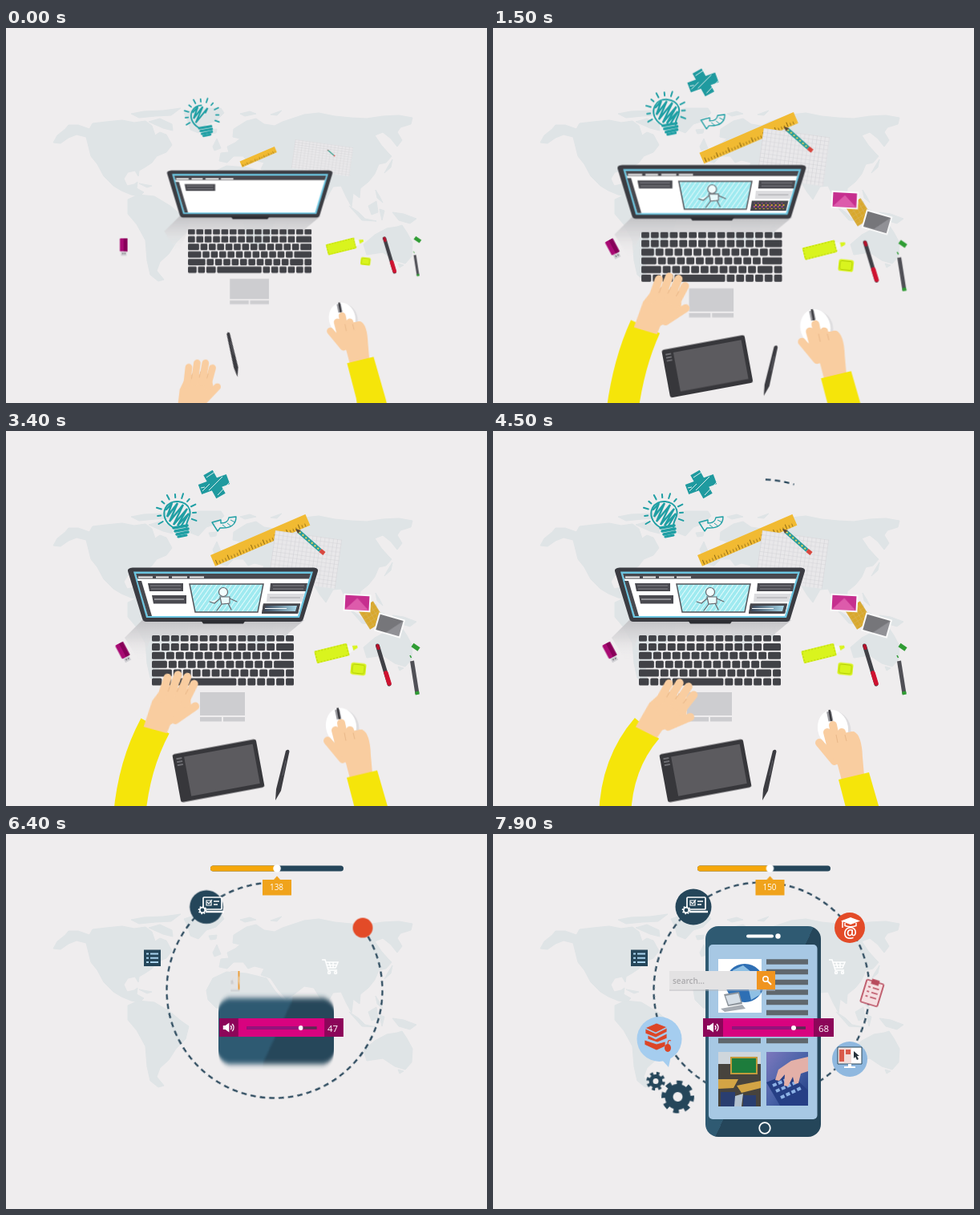
These frames come from a looping animation (600x468 px, 8 s). An HTML page:

```html
<!DOCTYPE html>
<html lang="en">
<head>
<meta charset="utf-8">
<title>Desk to mobile</title>
<style>
@property --n { syntax: "<integer>"; inherits: false; initial-value: 0; }
html, body { margin: 0; width: 100%; height: 100%; overflow: hidden; background: #efedee; }
#stage { position: relative; width: 600px; height: 468px; overflow: hidden; }
svg { position: absolute; inset: 0; }
svg, .num { font-family: "Open Sans", "Noto Sans", sans-serif; }
#stage * { animation-duration: 8s; animation-iteration-count: infinite; animation-fill-mode: both; animation-timing-function: linear; }

/* desk */
#desk { animation-name: fade; }
#camera { animation-name: camera; transform-origin: 529px 226px; }
@keyframes fade { 0%, 61.25% { opacity: 1 } 68.75%, 100% { opacity: 0 } }
@keyframes camera {
  0% { transform: scale(.87); animation-timing-function: cubic-bezier(.12,.5,.35,1) }
  30%, 100% { transform: none }
}
/* settles from a starting pose given by --from */
.settle { animation-name: settle; transform-box: fill-box; transform-origin: center; }
@keyframes settle {
  0% { transform: var(--from); animation-timing-function: ease-out }
  13%, 100% { transform: none }
}
.corner { transform-origin: 0 50%; }
.pop, .wide, .show { animation-delay: var(--d) !important; transform-box: fill-box; transform-origin: center; }
.pop { animation-name: pop; }
.wide { animation-name: wide; }
.show { animation-name: show; }
@keyframes pop { 0% { transform: scale(0); animation-timing-function: ease-out } 4%, 64% { transform: none } 64.01%, 100% { transform: scale(0) } }
@keyframes wide { 0% { transform: scaleX(0); animation-timing-function: ease-out } 5%, 64% { transform: none } 64.01%, 100% { transform: scaleX(0) } }
@keyframes show { 0% { opacity: 0 } 2.5%, 64% { opacity: 1 } 64.01%, 100% { opacity: 0 } }
.sketch { animation-name: sketch; stroke-dasharray: 1 1; }
@keyframes sketch { 0% { stroke-dashoffset: .5 } 8%, 100% { stroke-dashoffset: 0 } }

#right { animation-name: right; }
@keyframes right {
  0% { transform: translate(-9px,17px) }
  18.75% { transform: translate(-11px,9px) }
  28.75% { transform: none }
  56.25% { transform: translate(12px,5px) }
  66.25%, 100% { transform: translate(12px,11px) }
}
#left { animation-name: left; transform-origin: 180px 366px; }
@keyframes left {
  0% { transform: translate(0,150px); animation-timing-function: ease-out }
  13% { transform: translate(10px,10px) rotate(14deg) }
  18.75% { transform: translate(7px,9px) rotate(13deg) }
  28.75% { transform: none; animation-timing-function: ease-in-out }
  56.25% { transform: translate(12px,6px) rotate(23deg); animation-timing-function: ease-in-out }
  66.25%, 100% { transform: translate(-8px,13px) rotate(8deg) }
}
#sleeve { animation-name: sleeve; }
@keyframes sleeve {
  0% { d: path("M157 640 Q165 570 180 516"); animation-timing-function: ease-out }
  13% { d: path("M160 480 Q168 415 190 375") }
  18.75% { d: path("M158 480 Q166 420 187 374") }
  28.75% { d: path("M156 480 Q165 420 180 365"); animation-timing-function: ease-in-out }
  56.25% { d: path("M152 480 Q154 415 192 371"); animation-timing-function: ease-in-out }
  66.25%, 100% { d: path("M152 480 Q154 420 171 378") }
}

/* ring */
#spin { animation-name: spin; transform-origin: 335px 195px; }
#sweep { animation-name: sweep; stroke-dasharray: 360 360; }
@keyframes spin { 0%, 55% { transform: rotate(-91deg) } 80% { transform: rotate(-30deg) } 100% { transform: rotate(18deg) } }
@keyframes sweep { 0%, 55% { stroke-dashoffset: 360 } 66.25% { stroke-dashoffset: 222 } 80% { stroke-dashoffset: 67 } 85%, 100% { stroke-dashoffset: 0 } }
#ring { animation-name: ring; }
@keyframes ring { 0%, 55% { opacity: 0 } 55.01%, 100% { opacity: 1 } }

/* mobile */
#media, #numbers { animation-name: media; }
@keyframes media { 0%, 68.75% { visibility: hidden } 68.76%, 100% { visibility: visible } }
#body { animation-name: grow, blur; }
@keyframes grow {
  0%, 77% { y: 246px; height: 0 }
  80% { y: 205px; height: 82px }
  84%, 100% { y: 115px; height: 263px }
}
@keyframes blur { 0%, 83.5% { filter: url(#soft) } 83.51%, 100% { filter: none } }
#fill { animation-name: fill; }
@keyframes fill { 0%, 71.25% { width: 3px; animation-timing-function: ease-out } 80% { width: 83px } 98.75%, 100% { width: 90.5px } }
.thumb { animation-name: thumb; }
@keyframes thumb { 0%, 71.25% { transform: none; animation-timing-function: ease-out } 80% { transform: translateX(83px) } 98.75%, 100% { transform: translateX(90.5px) } }
#bar { animation-name: bar; transform-origin: 343px 242px; }
@keyframes bar { 0%, 76.25% { transform: scaleX(0) } 80% { transform: scaleX(.95) } 83%, 100% { transform: none } }
#knob { animation-name: knob; }
@keyframes knob { 0%, 76% { transform: translateX(-20px) } 80% { transform: translateX(-6px) } 98.75%, 100% { transform: none } }
#cart { animation-name: cart; }
@keyframes cart {
  0%, 77.5% { transform: translateX(-32px); opacity: 0 }
  80% { transform: translateX(-25px); opacity: 1; animation-timing-function: ease-out }
  87%, 100% { transform: none; opacity: 1 }
}
#screenIcon { animation-name: slide; }
@keyframes slide { 0%, 78% { transform: translateX(10px) } 80% { transform: translateX(4px) } 83%, 100% { transform: none } }
.gear { animation-name: turn; transform-box: fill-box; transform-origin: center; }
.back { animation-direction: reverse; }
@keyframes turn { to { transform: rotate(360deg) } }

.num { position: absolute; width: 36px; text-align: center; color: #fff; counter-reset: n var(--n); }
.num::after { content: counter(n); }
#value { left: 236.5px; top: 58.5px; font: 10px/15px "Open Sans", "Noto Sans", sans-serif; animation-name: thumb, value; }
@keyframes value { 0%, 71.25% { --n: 0; animation-timing-function: ease-out } 80% { --n: 138 } 98.75%, 100% { --n: 150 } }
#volume { left: 394.5px; top: 234px; font: 11.5px/17px "Open Sans", "Noto Sans", sans-serif; animation-name: loud, level; }
@keyframes loud { 0%, 78% { opacity: 0; transform: translateX(-8px) } 80% { opacity: 1; transform: translateX(-5px) } 83%, 100% { opacity: 1; transform: none } }
@keyframes level { 0%, 76% { --n: 20 } 80% { --n: 47 } 98.75%, 100% { --n: 68 } }
</style>
</head>
<body>
<div id="stage">
<svg width="600" height="468" viewBox="0 0 600 468" fill="none">
<defs>
  <linearGradient id="shade" x1="0" y1="237" x2="0" y2="285" gradientUnits="userSpaceOnUse">
    <stop stop-color="#c3c3c6"/><stop offset=".45" stop-color="#d9d8da" stop-opacity=".8"/><stop offset="1" stop-color="#efedee" stop-opacity="0"/>
  </linearGradient>
  <linearGradient id="case" x1="260" y1="209" x2="418" y2="283" gradientUnits="userSpaceOnUse">
    <stop offset=".5" stop-color="#2f5a72"/><stop offset=".5" stop-color="#25465a"/>
  </linearGradient>
  <linearGradient id="sky" x2="1"><stop stop-color="#39465a"/><stop offset="1" stop-color="#a8d9ea"/></linearGradient>
  <linearGradient id="desk2" x2="1" y2="1"><stop stop-color="#7d78bd"/><stop offset=".5" stop-color="#4a63a8"/><stop offset="1" stop-color="#1e3a80"/></linearGradient>
  <filter id="soft" x="-10%" y="-20%" width="120%" height="140%"><feGaussianBlur stdDeviation="0 3"/></filter>
  <pattern id="grid" width="5.2" height="5.2" patternUnits="userSpaceOnUse"><path d="M0 0H5.2M0 0V5.2" stroke="#cfcfd3"/></pattern>
  <pattern id="hatch" width="5" height="5" patternUnits="userSpaceOnUse" patternTransform="rotate(35)"><path d="M0 0V5" stroke="#e4fbfc" stroke-width="2"/></pattern>
  <pattern id="dots" width="5" height="5" patternUnits="userSpaceOnUse"><path d="M0 0h2v2h-2z" fill="#e8a13a"/><path d="M3 2h2v2h-2z" fill="#b04a9a"/></pattern>
  <mask id="trim" maskUnits="userSpaceOnUse" x="180" y="40" width="310" height="310"><circle id="sweep" cx="335" cy="195" r="134.5" pathLength="360" stroke="#fff" stroke-width="8"/></mask>
</defs>

<g id="map" fill="#dfe4e6" stroke="#dfe4e6" stroke-linejoin="round">
  <path d="M59 143 64 134 74 126 78 121 90 121 104 126 108 119 125 117 145 115 160 118 174 116 182 122 186 134 192 130 200 133 207 146 200 155 188 160 182 168 173 174 166 178 165 185 161 178 152 180 147 188 151 197 160 195 164 192 163 200 172 205 167 210 156 208 144 203 134 197 122 185 114 170 106 160 103 148 100 136 88 133 78 137 68 144Z"/>
  <path d="M222 106 240 100 268 100 272 106 262 116 250 120 240 131 230 127 227 116ZM156 107 172 104 196 103 218 100 206 109 186 110 166 112ZM178 117 192 113 207 120 208 128 196 125ZM166 194 182 197 176 199ZM253 127 263 126 262 131 255 132ZM258 148 263 138 268 150 260 153Z"/>
  <path d="M152 214 165 208 185 210 205 222 218 233 228 240 224 256 212 268 203 282 192 292 188 303 197 314 190 316 180 308 176 290 174 265 163 245 152 232Z"/>
  <path d="M266 166 268 156 278 155 276 148 286 143 292 138 283 136 284 126 300 116 312 113 322 120 335 122 345 117 360 112 372 108 390 106 410 110 430 112 450 113 470 110 490 109 507 112 505 120 492 124 488 130 494 140 488 148 480 138 470 130 460 134 468 146 476 155 481 160 474 168 465 170 460 182 452 192 442 200 441 212 433 206 431 223 424 210 418 197 408 198 399 214 392 205 384 192 372 190 362 198 350 206 340 195 330 180 318 176 322 168 310 165 302 168 296 160 284 160 276 168Z"/>
  <path d="M250 195 258 180 275 172 300 174 325 180 335 195 348 210 358 210 345 228 333 245 330 262 320 272 308 275 300 262 297 245 292 230 280 218 262 217 252 207ZM346 250 352 243 351 258 346 260Z"/>
  <path d="M446 270 460 258 475 250 488 248 494 246 500 255 507 268 506 285 498 294 485 290 470 280 450 283ZM428 222 440 230 448 238 462 241 444 240ZM452 222 462 216 464 230 456 233ZM466 226 472 228 469 240ZM482 230 496 232 512 238 504 244 490 240ZM461 202 466 210 470 218 463 212ZM482 164 480 174 472 181 477 172ZM489 294 496 296 491 299Z"/>
  <path d="M292 107 304 104 312 107 298 110ZM330 108 344 103 338 109Z"/>
</g>

<g id="desk"><g id="camera">
  <g class="settle" style="--from:translate(-11px,-11px)" stroke="#1f9fa4" stroke-width="2" stroke-linecap="round">
    <path class="sketch" pathLength="1" d="M208 120C198 114 195 104 199 96C205 84 225 86 229 98C232 107 224 112 225 120"/>
    <path class="sketch" pathLength="1" stroke-width="2.4" d="M200 98 207 90 201 107 214 90 204 113 221 92 209 117 226 97 214 118 228 103 219 118"/>
    <path d="M209 121 226 118M211 125 227 122M213 129 227 126" stroke-width="3.5"/>
    <path d="M215 132 225 130" stroke-width="3"/>
    <g id="rays"></g>
  </g>
  <g class="pop" style="--d:.45s">
    <path d="M242 73 277 60M252 52 268 81" stroke="#1f9a9f" stroke-width="13"/>
    <path d="M245 75 254 66M250 58 262 50M253 74 270 57M264 80 280 63M248 70 243 71" stroke="#dfeeee"/>
  </g>
  <g class="pop" style="--d:.75s" stroke="#1f9fa4" stroke-width="1.4" stroke-linejoin="round">
    <path d="M287 107Q287 122 267 121L264 125 257 114 268 111 268 115Q277 115 278 108Z"/>
    <path d="M270 117 275 121M276 115 281 119M280 111 286 114" stroke-width="1"/>
  </g>

  <g transform="translate(255 155) rotate(-23.3)"><g class="settle corner" style="--from:scale(.42,.6)">
    <path d="M0 0H129V15H0Z" fill="#f1ba32"/>
    <path d="M3 12.5H127" stroke="#8d6a14" stroke-width="4" stroke-dasharray=".8 3.2"/>
    <path d="M3 11H127" stroke="#8d6a14" stroke-width="6" stroke-dasharray="1 15"/>
  </g></g>
  <g transform="translate(336 124) rotate(8)"><g class="settle corner" style="--from:translateY(-8px) scaleY(.68)">
    <path d="M0 0H84V62H0Z" fill="#e9e8ea"/><path d="M0 0H84V62H0Z" fill="url(#grid)"/>
  </g></g>
  <g class="settle" style="--from:translate(8px,8px) scale(.3)">
    <path d="M366 126 392 149" stroke="#2a9c9a" stroke-width="5"/>
    <path d="M366 126 392 149" stroke="#f0d45a" stroke-width="2" stroke-dasharray="2 3"/>
    <path d="M392 149 397 153" stroke="#d8473f" stroke-width="5"/>
    <path d="M361 122 368 124 364 128Z" fill="#5b4a35"/>
  </g>

  <g id="laptop">
    <path d="M170 236 148 258 168 290 182 256H348L372 236Z" fill="url(#shade)"/>
    <path d="M158 170.500H384Q390 171 389 175L371 234Q370 238 366 238H175Q171 238 170 234L152 175Q151 171 158 170.500Z" fill="#3b3c42"/>
    <path d="M243 236H299L296 240.500H246Z" fill="#2d2e33"/>
    <path d="M159 175.500H383L366 233H175Z" fill="#6cc5e0"/>
    <path d="M162 178H380L364 231H177Z" fill="#fff"/>
    <path d="M162 178H380L378 184.500H164ZM164 187H169L182 231H177Z" fill="#48484e"/>
    <path d="M165 182.500H183M187 182.500H203M207 182.500H226M229 182.500H247" stroke="#f2f2f2" stroke-width="2"/>
    <path d="M177 190H221V200H179Z" fill="#4a4a50"/><path d="M180 193H218M181 197H218" stroke="#85858b"/>
    <g class="show" style="--d:2.9s"><path d="M182 205H225V215.500H184Z" fill="#4a4a50"/><path d="M185 210H222" stroke="#a6a6ab" stroke-width="1.500"/></g>
    <g class="show" style="--d:.4s"><path d="M330 190H376L374 200H329Z" fill="#4a4a50"/><path d="M333 193H372M333 197H371" stroke="#85858b"/></g>
    <g class="show" style="--d:.7s"><path d="M326 203H372L369 213H325Z" fill="#dcdcdf"/><path d="M329 208H367" stroke="#a4a4a8"/></g>
    <g class="show" style="--d:1s"><path d="M321 215.500H367L364 228H319Z" fill="#46464c"/><path d="M324 218H363L361 226H322Z" fill="url(#dots)"/></g>
    <g class="show" style="--d:1.800s"><path d="M321 215.500H367L364 228H319Z" fill="#46464c"/><path d="M324 218H363L361 225H322Z" fill="url(#sky)"/><path d="M323 221.500H350" stroke="#fff"/></g>
    <g class="pop" style="--d:.8s">
      <path d="M229 191H321L314 226H236Z" fill="#9feaf0"/>
      <path d="M229 191H321L314 226H236Z" fill="url(#hatch)" stroke="#55555b" stroke-width="1.500"/>
    </g>
    <g class="show" style="--d:1.050s" stroke="#68686e" stroke-width="1.200" stroke-linecap="round">
      <circle cx="271" cy="201" r="5.500" fill="#f2fdfd"/>
      <path d="M267 207H279V215L269 216ZM267 209 260 215 254 213M279 209 288 213M269 216 263 224M277 215 281 223" fill="#e9fbfc"/>
    </g>
    <g id="keys" fill="#414247"></g>
    <path d="M242 326H298V355H242ZM242 357H269V362.500H242ZM271 357H298V362.500H271Z" fill="#cdcdd0"/>
  </g>

  <g class="settle" style="--from:translate(-57px,4px) rotate(28deg)"><g transform="translate(146 275) rotate(-28)">
    <rect x="-5.500" y="-11" width="11" height="19" rx="1.500" fill="#a80a73"/><path d="M0-11H5.500V8H0Z" fill="#870059"/>
    <path d="M-4 8H4V14H-4Z" fill="#d0d0d4"/><path d="M-2 10h1.500v2h-1.500zM1 10h1.500v2h-1.500z" fill="#77777c"/>
  </g></g>
  <g class="settle" style="--from:translate(-5px,2px)"><g transform="translate(406.500 277.500) rotate(-14)">
    <rect x="-21" y="-8" width="42" height="16" rx="1.500" fill="#d9f41e"/>
    <rect x="-20" y="-7" width="40" height="14" stroke="#b4cd0a" stroke-dasharray="2 2"/>
    <path d="M21-5 26-3V4L21 5Z" fill="#f5f5f5"/><path d="M27-3 33-2V1L27 3Z" fill="#d9f41e"/>
  </g></g>
  <g class="settle" style="--from:translate(-3px,4px) scale(.75)"><g transform="rotate(6 439 297)">
    <rect x="430" y="289.500" width="19" height="15" rx="3" fill="#d9f41e"/><rect x="432" y="291.500" width="15" height="11" rx="2" stroke="#b4cd0a"/>
  </g></g>

  <g class="pop" style="--d:.6s"><g transform="translate(456 230) rotate(-32)"><path d="M-11-14H11V14H-11Z" fill="#d9a82c"/><path d="M-11-14H11V14H-11Z" fill="url(#grid)" opacity=".35"/></g></g>
  <g class="pop" style="--d:.7s"><g transform="translate(438 214.500) rotate(3)"><path d="M-17-11H17V11H-17Z" fill="#fafafa"/><path d="M-15-9H15V9H-15Z" fill="#c62f8f"/><path d="M-15 9 0-6 15 9Z" fill="#dd5bab"/></g></g>
  <g class="pop" style="--d:.8s"><g transform="translate(478.500 242.500) rotate(16)"><path d="M-17-12H17V12H-17Z" fill="#fafafa"/><path d="M-15-10H15V10H-15Z" fill="#76767a"/><path d="M-2 10 15-10V10Z" fill="#919196"/></g></g>

  <g stroke-linecap="round">
    <path d="M463.500 268 478 316" stroke="#404046" stroke-width="5"/><path d="M474 302 478 315" stroke="#cf1230" stroke-width="5.500"/><path d="M463.500 268 464.500 271" stroke="#b5122c" stroke-width="4"/>
    <path d="M507 267 515 272.500" stroke="#2f9c33" stroke-width="5.500" stroke-linecap="butt"/>
  </g>
  <g class="settle" style="--from:scale(.72)">
    <path d="M506.500 287 513 328" stroke="#505056" stroke-width="5"/><path d="M512.600 325 513.300 329" stroke="#2f9c33" stroke-width="5"/><path d="M504 280 505.500 283" stroke="#2f9c33" stroke-width="1.500"/>
  </g>

  <g class="pop" style="--d:.5s"><g transform="translate(265 424) rotate(-10.500)">
    <rect x="-53" y="-30.500" width="106" height="61" rx="3" fill="#37373b"/><path d="M-39-25H48V25H-39Z" fill="#5c5b5f"/>
    <path d="M-49-24H-42M-49-20H-42M-49-16H-42" stroke="#6e6e73" stroke-width="2"/>
  </g></g>
  <g class="settle" style="--from:translate(-98px,5px) rotate(-26deg)">
    <path d="M349 399Q353 396 353.500 400L343 449 336 461 337 447Z" fill="#3c3c41"/><path d="M349 411 345 430" stroke="#606066"/>
  </g>

  <g id="right">
    <g transform="rotate(-10 412 366)"><ellipse cx="414" cy="368" rx="20" ry="23" fill="#dedddf"/><ellipse cx="412" cy="366" rx="19" ry="23" fill="#fff"/></g>
    <path d="M407 345 409.500 357" stroke="#9a9a9f" stroke-width="6"/><path d="M407.500 343 410 357" stroke="#3c3c41" stroke-width="2.500"/>
    <g stroke="#f9cda0" stroke-width="10" stroke-linecap="round"><path d="M412 362 419 396M423 371 428 396M436 375 440 396M395 384 414 407M405 371 412 398"/></g>
    <path d="M403 388 410 374 438 370Q448 374 449 402L451 425 423 431 418 412Z" fill="#f9cda0"/>
    <path d="M418 384 416 374M429 382 427 374" stroke="#eab98a"/>
    <path d="M419 430 457 421 474 480 494 560H444L432 480Z" fill="#f5e50a"/>
  </g>
  <path id="sleeve" d="M156 480 Q165 420 180 365" stroke="#f5e50a" stroke-width="40"/>
  <g id="left">
    <path d="M166 369 170 335 180 314 214 312 219 334Q210 350 198 360L196 371Z" fill="#f9cda0"/>
    <path d="M183 303 180 330M195 297 191 325M207 297 202 325M217 304 210 330M224 331 203 353" stroke="#f9cda0" stroke-width="10" stroke-linecap="round"/>
    <path d="M188 312 187 320M200 309 198 318M211 312 209 319" stroke="#eab98a"/>
  </g>
</g></g>

<g id="ring"><g id="spin"><circle cx="335" cy="195" r="134.500" mask="url(#trim)" stroke="#2a485c" stroke-width="2.300" pathLength="864" stroke-dasharray="6.800 5.200"/></g></g>

<g id="media">
  <g class="wide" style="--d:5.600s"><rect x="255" y="39.500" width="166" height="7" rx="3.500" fill="#25465a"/><rect id="fill" x="255" y="39.500" width="83" height="7" rx="3.500" fill="#f5a70a"/></g>
  <g class="show" style="--d:5.700s"><g class="thumb"><circle cx="255" cy="43" r="4.800" fill="#fff"/><path d="M237 57H251L255 52.500 259 57H273V76.500H237Z" fill="#f0a31c"/></g></g>

  <rect id="body" x="265" y="115" width="144" height="263" rx="16" fill="url(#case)"/>
  <g class="show" style="--d:6.650s"><path d="M318 127.500H348" stroke="#fff" stroke-width="4" stroke-linecap="round"/><circle cx="355.500" cy="127.500" r="3.200" fill="#fff"/><circle cx="339" cy="367" r="6.800" stroke="#fff" stroke-width="1.800"/></g>
  <g class="show" style="--d:6.700s"><rect x="269" y="138" width="135.500" height="218" rx="5" fill="#a7c8e4"/></g>
  <g class="wide" style="--d:6.800s" stroke="#5f676d" stroke-width="6.500"><path d="M341 159.500H393M341 172H393M341 185H393M341 197.500H393M341 210H393M341 223H393M341 258H393M281 258H334"/></g>
  <g class="pop" style="--d:6.850s">
    <path d="M281 156H335V223H281Z" fill="#fff"/><circle cx="314" cy="186" r="24" fill="#2e6fb4"/><path d="M299 170 312 164 322 172 314 184 302 182ZM318 190 332 186 334 200 322 207Z" fill="#8fc0e4"/>
    <path d="M288 200 307 197 311 212 293 215Z" fill="#8d949c"/><path d="M290 202 306 199 309 210 294 213Z" fill="#d6dee6"/><path d="M284 218 311 213 315 218 289 222Z" fill="#a6abb2"/>
  </g>
  <g class="pop" style="--d:6.950s">
    <path d="M281 272H334V340H281Z" fill="#47433d"/><path d="M281 272H334V287H281Z" fill="#cfd6dc"/><path d="M296 278H330V300H296Z" fill="#c29a3c"/><path d="M298 280H328V298H298Z" fill="#1d7c3c"/>
    <path d="M281 306H306L300 317 281 318ZM304 314 334 308V317L310 323Z" fill="#d3a445"/><path d="M284 322H302V340H284ZM312 326H328V340H312Z" fill="#2a3e70"/><path d="M302 327 312 324 310 340H301Z" fill="#b5c3d0"/>
  </g>
  <g class="pop" style="--d:7s">
    <path d="M341 272H393V339H341Z" fill="url(#desk2)"/><path d="M341 310 370 298 393 320V339H358Z" fill="#263f85"/>
    <path d="M349 314 370 305M353 321 378 310M359 329 384 317" stroke="#8db2e6" stroke-width="4" stroke-dasharray="5 2.500"/>
    <path d="M393 278 372 283 356 294 352 307 357 308 364 300 363 314 368 315 374 303 376 312 381 311 384 299 393 296Z" fill="#e3b0a8"/>
  </g>

  <g id="bar">
    <path d="M262 230H425V253H262Z" fill="#d8037f"/><path d="M262 230H287V253H262ZM400 230H425V253H400Z" fill="#8c0659"/>
    <path d="M267 239H270L275 235.500V247.500L270 244H267Z" fill="#fff"/><path d="M277 239Q279 241.500 277 244M279 237Q283 241.500 279 246" stroke="#fff" stroke-width="1.400"/>
    <path d="M298 242H390" stroke="#5a2a52" stroke-width="3.500"/><path d="M298 242H372" stroke="#96127f" stroke-width="3.500"/><circle id="knob" cx="375" cy="242" r="3" fill="#fff"/>
  </g>

  <g class="wide" style="--d:6.380s">
    <path d="M220 173H352V196H220Z" fill="#b9b9bd" opacity=".5"/><path d="M220 171H330V194H220Z" fill="#e3e2e3"/><path d="M329 171H352V194H329Z" fill="#f0941f"/>
    <text x="224" y="187" font-size="10" font-weight="600" fill="#aaa9ac">search...</text>
    <circle cx="340" cy="181" r="3.200" stroke="#fff" stroke-width="1.500"/><path d="M342.500 183.500 347 188" stroke="#fff" stroke-width="2"/>
  </g>

  <g class="pop" style="--d:6.150s"><circle cx="250" cy="91" r="22.500" fill="#25465a"/></g>
  <g class="show" style="--d:6.150s"><g id="screenIcon" stroke="#fff" stroke-width="1.700">
    <rect x="242" y="79" width="23" height="15" rx="1"/><path d="M245 97H268" stroke-width="2.500"/><path d="M246 83H252V89H246ZM247 85 249 87 253 82" stroke-width="1.200"/><path d="M255 84H262M255 88H260"/>
    <circle cx="241" cy="95" r="3.300" fill="#25465a"/><circle cx="241" cy="95" r="4.600" stroke-width="1.500" pathLength="16" stroke-dasharray="1"/>
  </g></g>
  <g class="pop" style="--d:5.900s"><path d="M172 144.500H193V165H172Z" fill="#25465a"/><path d="M175 149.500H178M175 154.800H178M175 160H178M180 149.500H190M180 154.800H190M180 160H190" stroke="#a9d3ee" stroke-width="2"/></g>
  <g class="pop" style="--d:6.250s"><circle cx="445" cy="117" r="19" fill="#e34b28"/></g>
  <g class="show" style="--d:6.650s"><path d="M434 108.500 446 104 458 108.500 446 113Z" fill="#fff"/><path d="M439 111V114.500Q446 117 453 114.500V111M436 109V117" stroke="#fff" stroke-width="1.500"/><text x="445.500" y="130" font-size="19" font-weight="600" text-anchor="middle" fill="#fff">@</text></g>
  <g id="cart" stroke="#fff" stroke-width="1.500"><path d="M419 157H423L427 170H438M424 160H439L436 167H426M428 160 430 167M433 160V167M425 163.500H438"/><circle cx="428" cy="173" r="1.500"/><circle cx="436" cy="173" r="1.500"/></g>
  <g class="pop" style="--d:6.700s"><g transform="translate(473 198) rotate(17)" stroke="#b84a5c" stroke-width="1.700">
    <rect x="-11" y="-14" width="22" height="29" rx="1.500" fill="#f5dfe1"/><path d="M-4-16H4V-11H-4Z" fill="#b84a5c"/><path d="M-7-6H-4M-7 0H-4M-7 6H-4M-1-6H7M-1 0H7M-1 6H7"/>
  </g></g>
  <g class="pop" style="--d:6.800s">
    <path d="M210 281 219 291 222 277Z" fill="#a5cdef"/><circle cx="207.500" cy="256" r="28" fill="#a5cdef"/>
    <g fill="#dc4527" stroke="#a5cdef" stroke-width=".8"><path d="M190 242 204 236 217 241 203 248ZM190 243V249L203 254 217 247V242L203 249ZM193 251V256L205 260 217 255V249L203 256ZM189 257V263L204 270 215 265V259L204 262Z"/></g>
    <ellipse cx="218" cy="267" rx="4" ry="5" fill="#dc4527"/><path d="M218 262Q218 256 222 258" stroke="#dc4527" stroke-width="1.200"/>
  </g>
  <g class="pop" style="--d:6.850s">
    <circle cx="445" cy="281" r="22" fill="#8fb8df"/><path d="M430 266H460V287H430Z" fill="#fff" stroke="#2b4658"/><path d="M431 267H447V286H431Z" fill="#f2dcd9"/><path d="M432 269H438V284H432ZM440 269H446V275H440Z" fill="#d95a4b"/>
    <path d="M450 271 457 277 454 277 456 281 454 282 452 278 450 280Z" fill="#26323b"/><path d="M443 287H447V290H452V292H438V290H443Z" fill="#fff"/>
  </g>
  <g class="pop" style="--d:6.950s" stroke="#25465a">
    <g class="gear"><circle cx="230.500" cy="328" r="11" stroke-width="10"/><circle cx="230.500" cy="328" r="17.500" stroke-width="6" pathLength="16" stroke-dasharray="1"/></g>
  </g>
  <g class="pop" style="--d:6.900s" stroke="#25465a">
    <g class="gear back"><circle cx="203" cy="308.500" r="6" stroke-width="5"/><circle cx="203" cy="308.500" r="9.700" stroke-width="4" pathLength="16" stroke-dasharray="1"/></g>
  </g>
</g>
</svg>
<div id="numbers"><span id="value" class="num"></span><span id="volume" class="num"></span></div>
</div>
<script>
const make = (parent, tag, attrs) => {
  const el = document.createElementNS("http://www.w3.org/2000/svg", tag);
  for (const name in attrs) el.setAttribute(name, attrs[name]);
  document.getElementById(parent).append(el);
};

// Each row is 15 units wide.
const ones = n => Array(n).fill(1);
const rows = [
  ones(15),
  [...ones(13), 2],
  [1.5, ...ones(12), 1.5],
  [1.75, ...ones(11), 2.25],
  [2.25, ...ones(10), 1.75, 1],
  [1.2, 1, 1.3, 5.5, ...ones(6)]
];
const unit = 179 / 15;
rows.forEach((row, r) => {
  let x = 182;
  for (const w of row) {
    make("keys", "rect", { x, y: r ? 254 + r * 10.9 : 255, width: w * unit - 2, height: r ? 9 : 7.5, rx: 1.5 });
    x += w * unit;
  }
});

for (let i = 0; i < 11; i++) {
  const a = (150 + i * 23) * Math.PI / 180, long = i % 2 ? 24 : 26;
  const at = r => `${213 + r * Math.cos(a)} ${103 + r * Math.sin(a)}`;
  make("rays", "path", { d: `M${at(20)}L${at(long)}` });
}
</script>
</body>
</html>
```
